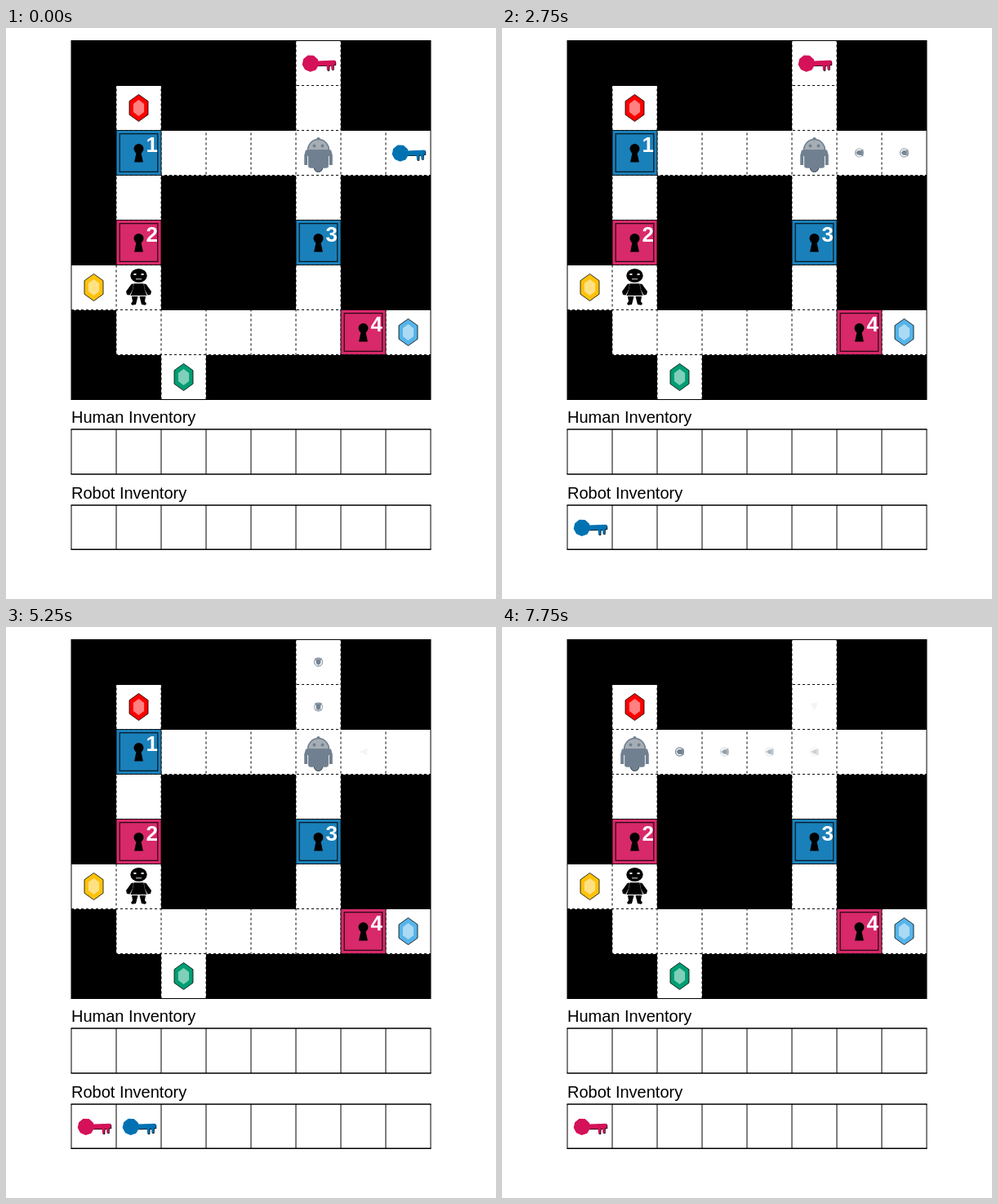
An HTML page for the animation above (8000 ms loop, 600 by 700 pixels).

```html
<!DOCTYPE html>
<html lang="en">
<head>
<meta charset="utf-8">
<title>Doors, keys and gems</title>
<style>
  html, body { margin: 0; width: 100%; height: 100%; overflow: hidden; background: #fff; }
  svg { display: block; width: 100%; height: 100%; }
  text { font-family: "Liberation Sans", Arial, sans-serif; }
</style>
</head>
<body>
<svg viewBox="0 0 600 700">
  <rect width="600" height="700" fill="#fff"/>
  <g id="board"></g>
  <g id="scene"></g>
  <g id="trail"></g>
  <g id="robot"></g>
  <g id="bag"></g>
</svg>
<script>
const CELL = 55, LEFT = 80, TOP = 15.5, SIZE = 8 * CELL;
const FRAME = 250, FRAMES = 32, TRAIL = 13;
const BLUE = "#0072b2", PINK = "#d41159", SLATE = "#708090";
const el = id => document.getElementById(id);

// '.' is open floor, '#' is wall
const MAP = [
  "#####.##",
  "#.###.##",
  "#.......",
  "#.###.##",
  "#.###.##",
  "..###.##",
  "#.......",
  "##.#####",
];

// one action per two frames; P picks up, O opens
const ACTIONS = "RRPLLUUPDDLLLOL";
const STEP = { R: [1, 0], L: [-1, 0], U: [0, -1], D: [0, 1], P: [0, 0], O: [0, 0] };
const ANGLE = { R: 0, D: 90, L: 180, U: 270 };

// frame at which the nth action takes effect
const BLUE_TAKEN = 6, PINK_TAKEN = 16, DOOR_OPENED = 28;

const center = (col, row) => [LEFT + (col + .5) * CELL, TOP + (row + .5) * CELL];
const at = (x, y, body, turn = 0) =>
  `<g transform="translate(${x} ${y}) rotate(${turn})">${body}</g>`;
const inCell = (col, row, body) => at(...center(col, row), body);
const poly = (points, attrs) => `<polygon points="${points}" ${attrs}/>`;
const line = (x1, y1, x2, y2, attrs) =>
  `<line x1="${x1}" y1="${y1}" x2="${x2}" y2="${y2}" ${attrs}/>`;

function gem(color) {
  const hex = (w, h) => `0,${-h} ${w},${-h / 2} ${w},${h / 2} 0,${h} ${-w},${h / 2} ${-w},${-h / 2}`;
  return poly(hex(11.5, 16.5), `fill="${color}" stroke="#000" stroke-width=".8"`) +
    poly(hex(6.6, 10), `fill="#fff" fill-opacity=".5"`);
}

function key(color) {
  const head = Array.from({ length: 9 }, (_, i) => {
    const a = i * Math.PI * 2 / 9 + .2;
    return `${(-9.6 + 10.3 * Math.cos(a)).toFixed(1)},${(.4 + 10.3 * Math.sin(a)).toFixed(1)}`;
  }).join(" ");
  const shaft = "-1,-2.6 20,-3.4 21,-2 21,2 18.6,2.4 18.4,8 16,8 15.6,3 13.4,3 13,9 10.6,9 10,3 -1,3.4";
  return at(.7, .7, poly(shaft, `fill="#000"`)) +
    poly(head, `fill="${color}"`) + poly(shaft, `fill="${color}"`);
}

function door(color, label) {
  const box = (r, w) => `<rect x="${-r}" y="${-r}" width="${2 * r}" height="${2 * r}"
    fill="${color}" stroke="#000" stroke-width="${w}" stroke-opacity=".85"/>`;
  return box(27.5, 1) + box(23.3, 1.2) +
    `<circle cy="-5" r="6"/>` + poly("-2.6,-2 2.6,-2 5.4,11.5 -5.4,11.5", "") +
    `<text x="16.3" y="-1.2" font-size="26" font-weight="bold" fill="#fff" text-anchor="middle">${label}</text>`;
}

function human() {
  const half = `
    <path d="M6.5 -4.5 L9 -4 L15.5 5 L14.5 9 L11 9.5 L7 2Z"/>
    <path d="M1 11 L8.5 11 L7.5 17 L9.5 20 L8 21.8 L3.5 21 Z"/>
    <ellipse cx="4.6" cy="-16" rx="1.9" ry="1.1" fill="#fff"/>`;
  return `<ellipse cy="-14.5" rx="10.2" ry="8.6"/>
    <path d="M-6 -4.8 H6 L7 2 L10 10 H-10 L-7 2Z"/>` +
    half + `<g transform="scale(-1 1)">${half}</g>` +
    `<path d="M-3.5 -10.2 H3.5" stroke="#fff" stroke-width=".9"/>`;
}

function robot() {
  const arm = `<path d="M11 -3.5 H15.5 L17.3 3 V15 H13.3 V4 H11Z"/>`;
  return `<g fill="${SLATE}">
    <circle cy="18.3" r="5.2" stroke="#3c4652"/>
    <circle cy="-16.8" r="2.2"/>
    <path d="M-13 -3 A13 13.5 0 0 1 13 -3Z" fill="#a6adb5" stroke="${SLATE}" stroke-width="1.6"/>
    <circle cx="-5" cy="-8.5" r="1.9"/><circle cx="5" cy="-8.5" r="1.9"/>
    <path d="M-12.4 -3.8 H12.4 V16 Q12.4 18.8 9.5 18.8 H-9.5 Q-12.4 18.8 -12.4 16Z"/>
    ${arm}<g transform="scale(-1 1)">${arm}</g></g>`;
}

function board() {
  let out = "";
  MAP.forEach((cells, row) => [...cells].forEach((c, col) => {
    if (c === "#") out += `<rect x="${LEFT + col * CELL}" y="${TOP + row * CELL}"
      width="${CELL}" height="${CELL}" shape-rendering="crispEdges"/>`;
  }));
  const dash = `stroke="#000" stroke-dasharray="3 3"`;
  for (let i = 1; i < 8; i++) {
    const x = LEFT + i * CELL, y = TOP + i * CELL;
    out += line(x, TOP + SIZE, x, TOP, dash) + line(LEFT, y, LEFT + SIZE, y, dash);
  }
  out += `<rect x="${LEFT}" y="${TOP}" width="${SIZE}" height="${SIZE}" fill="none" stroke="#000"/>`;
  return out + inventory("Human", 484, 492, 547) + inventory("Robot", 577, 585, 639.3);
}

function inventory(owner, base, top, bottom) {
  let out = `<text x="80" y="${base}" font-size="20">${owner} Inventory</text>`;
  for (let i = 0; i <= 8; i++) {
    const x = LEFT + i * CELL;
    out += line(x, top, x, bottom, `stroke="#000"`);
  }
  for (const y of [top, bottom])
    out += line(LEFT - .5, y, LEFT + SIZE + .5, y, `stroke="#000" stroke-width="1.4"`);
  return out;
}

function place(n) {
  let [col, row] = [5, 2];
  for (const a of ACTIONS.slice(0, n >> 1)) {
    col += STEP[a][0];
    row += STEP[a][1];
  }
  return [col, row];
}

// An arrow where the robot leaves a cell, a ringed dot where it waits.
function marker(s) {
  const next = s % 2 ? ACTIONS[s >> 1] : "";
  if (next in ANGLE)
    return at(0, 0, poly("-4.8,-4.6 4.8,0 -4.8,4.6", `fill="${SLATE}"`), ANGLE[next]);
  return `<circle r="5.1" fill="none" stroke="${SLATE}" stroke-width=".8"/>
    <circle r="2.9" fill="${SLATE}"/>`;
}

function trail(n) {
  const span = Math.min(n, TRAIL);
  const [nowCol, nowRow] = place(n);
  let out = "";
  for (let s = n - span + 1; s < n; s++) {
    const [col, row] = place(s);
    if (col === nowCol && row === nowRow) continue;
    const alpha = 1 - (n - s) / span;
    out += `<g opacity="${alpha.toFixed(3)}">${inCell(col, row, marker(s))}</g>`;
  }
  return out;
}

function scene(n) {
  const blue = "#1a80ba", pink = "#d8296a";
  return [
    n < DOOR_OPENED && [1, 2, door(blue, 1)],
    [1, 4, door(pink, 2)],
    [5, 4, door(blue, 3)],
    [6, 6, door(pink, 4)],
    n < PINK_TAKEN && [5, 0, key(PINK)],
    n < BLUE_TAKEN && [7, 2, key(BLUE)],
    [1, 1, gem("#ff0000")],
    [0, 5, gem("#ffc20a")],
    [7, 6, gem("#56b4e9")],
    [2, 7, gem("#009e73")],
    [1, 5, human()],
  ].filter(Boolean).map(item => inCell(...item)).join("");
}

function bag(n) {
  const held = [];
  if (n >= PINK_TAKEN) held.push(PINK);
  if (n >= BLUE_TAKEN && n < DOOR_OPENED) held.push(BLUE);
  return held.map((color, i) => at(LEFT + (i + .5) * CELL, 612.2, key(color))).join("");
}

function draw(n) {
  el("scene").innerHTML = scene(n);
  el("trail").innerHTML = trail(n);
  el("robot").innerHTML = inCell(...place(n), robot());
  el("bag").innerHTML = bag(n);
}

let shown = -1;
const start = performance.now();
function tick() {
  const n = Math.floor((performance.now() - start) / FRAME) % FRAMES;
  if (n !== shown) draw(shown = n);
  requestAnimationFrame(tick);
}
el("board").innerHTML = board();
tick();
</script>
</body>
</html>
```
